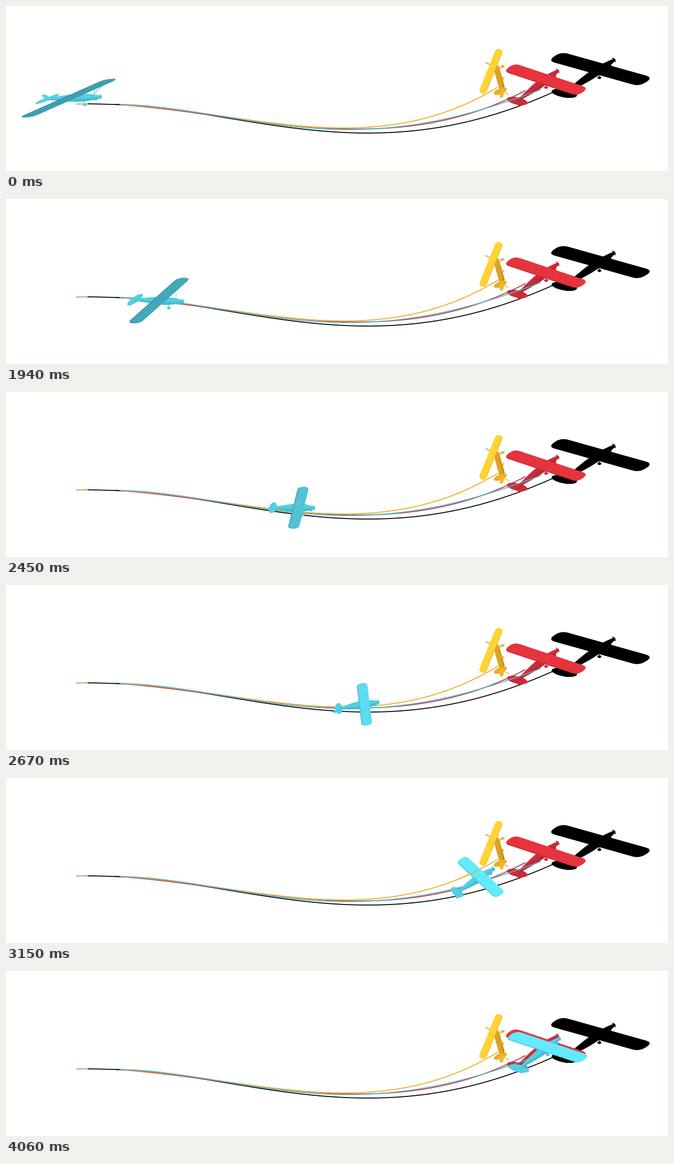
A matplotlib script for the animation above (6 s loop, 1200 px wide and 300 px high).

```python
from math import comb

import numpy as np
import matplotlib.pyplot as plt
from matplotlib.animation import FuncAnimation
from matplotlib.colors import to_rgb
from matplotlib.patches import Ellipse, Polygon

W, H, DPI = 1200, 300, 100
LOOP, STEP, BEAT = 6000, 20, 30
PX = 72 / DPI

fig = plt.figure(figsize=(W / DPI, H / DPI), dpi=DPI, facecolor="white")
ax = fig.add_axes([0, 0, 1, 1])
ax.set_xlim(0, W)
ax.set_ylim(H, 0)
ax.axis("off")


def stroke(x, y, color, z, width=1.7, **kw):
    return ax.plot(x, y, color=color, lw=width * PX, zorder=z, **kw)[0]


def shape(points, color, z):
    return ax.add_patch(Polygon(points, closed=True, fc=color, ec="none", zorder=z))


def blob(x, y, w, h, angle, color, z):
    return ax.add_patch(Ellipse((x, y), w, h, angle=angle, fc=color, ec="none", zorder=z))


def shade(color, k):
    return tuple(np.clip(np.array(to_rgb(color)) * k, 0, 1))


def polar(r, degrees):
    a = np.radians(degrees)
    return r * np.array([np.cos(a), np.sin(a)])


def glide(t, times, values):
    """Smooth motion through the key values, coming to rest at the last one."""
    times, values = np.array(times, float), np.array(values, float)
    m = np.gradient(values, times, axis=0)
    m[-1] = 0
    t = np.clip(t, times[0], times[-1])
    i = min(np.searchsorted(times, t, "right"), len(times) - 1) - 1
    h = times[i + 1] - times[i]
    u = (t - times[i]) / h
    return ((1 + 2 * u) * (1 - u) ** 2 * values[i] + u * (1 - u) ** 2 * h * m[i]
            + u * u * (3 - 2 * u) * values[i + 1] + u * u * (u - 1) * h * m[i + 1])


# ---- flight paths: Bezier height over evenly running x ----
def path(end_x, *heights):
    u = np.linspace(0, 1, 300)
    n = len(heights) - 1
    y = sum(comb(n, k) * u ** k * (1 - u) ** (n - k) * c for k, c in enumerate(heights))
    return 200 + (end_x - 200) * u, y


GOLD, CYAN = "#f5a91f", "#48b9cd"
gold_x, gold_y = path(891, 179, 187.3, 288, 148)

stroke(*path(1000, 179.3, 184, 270, 245, 153), "black", 1)
stroke(*path(941, 179, 195, 284, 154), "#c9303f", 1.1)
stroke(gold_x, gold_y, GOLD, 1.2)
stroke(*path(969, 179, 179.1, 273, 224.2, 152), CYAN, 4)
stroke([128, 150], [178.3, 178], CYAN, 1.3)
stroke([134, 150], [178.2, 178], GOLD, 1.4, ls=(0, (1.5, 0.8)))
stroke([149, 205], [177.8, 179.2], "black", 4.1)
gold_front = stroke([], [], GOLD, 6)

# ---- plane rig ----
th = np.linspace(-np.pi / 2, np.pi / 2, 21)
tip_a = 0.85 + 0.16 * np.abs(np.cos(th)) ** 0.8
tip_b = np.sign(th) * np.abs(np.sin(th)) ** 0.8
OUTLINE = np.column_stack([np.r_[tip_a, -tip_a], np.r_[tip_b, -tip_b]])
ring = np.linspace(0, 2 * np.pi, 40)
OVAL = np.column_stack([np.cos(ring), np.sin(ring)])
ALONG = np.linspace(0, 1, 16)[:, None]
GIRTH = 2 + 5.3 * np.sin(np.pi * ALONG ** 1.3)


class Plane:
    def __init__(self, z):
        dot = [[0, 0]]
        self.struts = [stroke([], [], "k", z, 0.9) for _ in range(3)]
        self.legs = [stroke([], [], "k", z, 1.2) for _ in range(2)]
        self.wheels = [blob(0, 0, 7, 5, 0, "k", z + 0.1) for _ in range(2)]
        self.tail, self.body, self.belly, self.fin = (
            shape(dot, "k", z + 0.1 * k) for k in range(2, 6))
        self.prop = stroke([], [], "k", z + 0.6, 1.6)
        self.edge, self.wing = (shape(dot, "k", z + 0.1 * k) for k in (7, 8))

    def pose(self, key, wing, body, strut=0):
        mid, axis = np.array(key[:2]), np.array(key[4:6])
        reach, bank, seat = key[2], key[3], key[6]
        span, chord = polar(reach, bank), 0.13 * axis
        tail = mid - seat * axis
        fwd = axis / np.hypot(*axis)
        side = np.array([-fwd[1], fwd[0]])

        spine, half = tail + ALONG * axis, GIRTH * side
        low = (spine + half)[::-1]
        self.body.set_xy(np.vstack([spine - half, low]))
        self.belly.set_xy(np.vstack([spine + 0.25 * half, low]))
        self.tail.set_xy(tail + OVAL @ np.array([0.26 * span, 0.7 * chord]))
        up = polar(5.5, 261 + 1.33 * bank)
        self.fin.set_xy(tail + up + OVAL @ np.array([up, 5 * fwd]))
        hub = tail + axis - 2 * fwd
        self.prop.set_data(*np.array([hub - 4 * side, hub + 4 * side]).T)

        plan = mid + OUTLINE @ np.array([span, chord])
        self.edge.set_xy(plan)
        self.wing.set_xy(mid + 0.1 * chord + OUTLINE @ np.array([span, 0.9 * chord]))

        for wheel, leg, q, drop in zip(self.wheels, self.legs, (0.67, 0.87), (13, 4)):
            hip = tail + q * axis
            foot = hip + [2, drop]
            wheel.set_center(foot)
            leg.set_data(*np.array([hip, foot]).T)
        for line, a, b in zip(self.struts, (0.62, 0.9, -0.36), (0.85, 0.8, 0.6)):
            line.set_data(*np.array([mid + a * span, tail + b * axis]).T)
            line.set_alpha(strut)

        for part in (self.body, self.tail, self.fin, *self.wheels):
            part.set_facecolor(body)
        self.belly.set_facecolor(shade(body, 0.91))
        self.wing.set_facecolor(wing)
        self.edge.set_facecolor(shade(wing, 0.88))
        for line in (*self.legs, *self.struts, self.prop):
            line.set_color(shade(body, 0.9))
        return plan


# wing middle x, y, half span, its angle, nose-to-tail x, y, seat of the wing
TIMES = [1650, 2250, 2670, 2940, 3360, 4050]
KEYS = [
    (113.5, 167.5, 85, -24, 98, -4, 0.39),
    (437.5, 200.5, 43, -61.5, 80, 5.5, 0.57),
    (649.5, 217, 38, -97, 73.5, -12, 0.63),
    (779.5, 202, 41.5, -122, 72.5, -30, 0.63),
    (922, 158, 55.5, -148.5, 63, -55, 0.63),
    (981.5, 138.5, 70, -161.5, 75, -56, 0.69),
]
TONES = [to_rgb(c) for c in ("#3c9fb0", "#4ab4c6", "#62ebfe")]

red_x, red_y, *red_form = KEYS[-1]
Plane(3).pose((red_x - 3, red_y - 4.5, *red_form), "#e6343f", "#cd2b39")
Plane(2).pose((1077.3, 114.8, 85.5, -164.3, 92, -62, 0.71), "black", "black")
cyan = Plane(5)

# ---- yellow plane, steeply banked ----
AMBER, SUN = "#dfa322", "#ffd333"
stroke([870, 886], [103, 111], AMBER, 7, 1.8)
stroke([890, 900], [117, 110], AMBER, 7, 1.5)
stroke([896, 902], [142, 130], AMBER, 7, 1.8)
stroke([903, 911], [157, 161], AMBER, 7, 1.2)
blob(900, 110, 8, 4.5, -15, "#eab22a", 7.1)
shape([(883, 111), (893, 108), (904, 147), (900, 153), (894, 151)], AMBER, 7.2)
shape([(893, 110), (904, 147), (901, 149)], "#c98d1b", 7.3)
blob(896, 155, 25, 10, -22, "#e8ad26", 7.4)
blob(898.5, 159, 8, 16, 5, "#f0b92a", 7.5)
gold_plan = [878.5, 118.5] + OUTLINE @ np.array([[16, -39.5], [6, 1.6]])
shape(gold_plan + [0.8, 0.6], "#e6b026", 7.6)
gold_wing = shape(gold_plan, SUN, 7.7)
speckle = stroke([], [], "#62ecff", 7.8, 1.6, ls=":")
speckle.set_clip_path(gold_wing)


def draw(n):
    t = BEAT * round(n * STEP / BEAT)
    key = glide(t, TIMES, KEYS)
    tone = np.clip(glide(t, [1650, 2250, 2940], TONES), 0, 1)
    strut = np.clip((2250 - t) / 600, 0, 1)
    plan = cyan.pose(key, tuple(tone), "#52cfe2", strut)
    speckle.set_data(*plan.T)
    near = (t > 2800) & (np.abs(gold_x - key[0] + 22) < 18)
    gold_front.set_data(gold_x[near], gold_y[near])
    return []


anim = FuncAnimation(fig, draw, frames=LOOP // STEP, interval=STEP,
                     init_func=lambda: draw(0), repeat=True, repeat_delay=0, blit=False)
plt.show()
```
